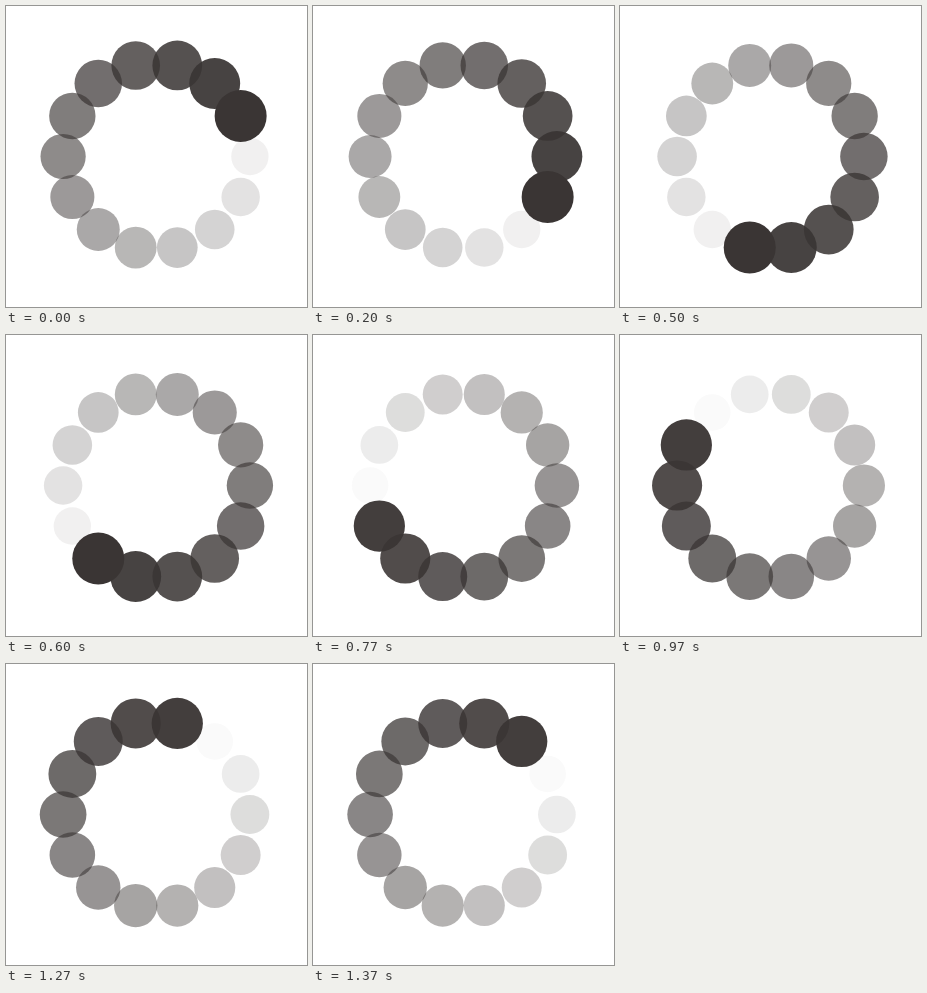
An HTML page for the animation above (1410 ms loop, 301 by 301 pixels).

```html
<!DOCTYPE html>
<html lang="en">
<head>
<meta charset="utf-8">
<title>Loading ring</title>
<style>
  html, body { margin: 0; width: 100%; height: 100%; overflow: hidden; background: #fff; }
  svg { display: block; width: 100vw; height: 100vh; }
  circle { fill: #3a3534; }
</style>
</head>
<body>
<svg id="ring" viewBox="0 0 301 301"></svg>
<script>
  const LOOP = 1410, DOTS = 14, STEPS = 42;
  const CENTER = 150.5, RADIUS = 93.4, BIG = 26, SMALL = 18.1;
  const ring = document.getElementById('ring');

  const dots = Array.from({ length: DOTS }, (_, i) => {
    const dot = document.createElementNS(ring.namespaceURI, 'circle');
    const angle = i / DOTS * 2 * Math.PI;
    dot.setAttribute('cx', CENTER + RADIUS * Math.cos(angle));
    dot.setAttribute('cy', CENTER + RADIUS * Math.sin(angle));
    return ring.appendChild(dot);
  });

  // Steps last 30 or 40 ms, 33.5 ms on average.
  const stepAt = ms => Math.floor((Math.floor(ms % LOOP / 10) + 0.5) / 3.35);

  function draw(step) {
    dots.forEach((dot, i) => {
      const age = (step - (i + 1) * STEPS / DOTS + STEPS) % STEPS / STEPS;
      dot.setAttribute('r', BIG + (SMALL - BIG) * age);
      dot.setAttribute('fill-opacity', 1 - age);
    });
  }

  function tick() {
    draw(stepAt(performance.now()));
    requestAnimationFrame(tick);
  }
  tick();
</script>
</body>
</html>
```
